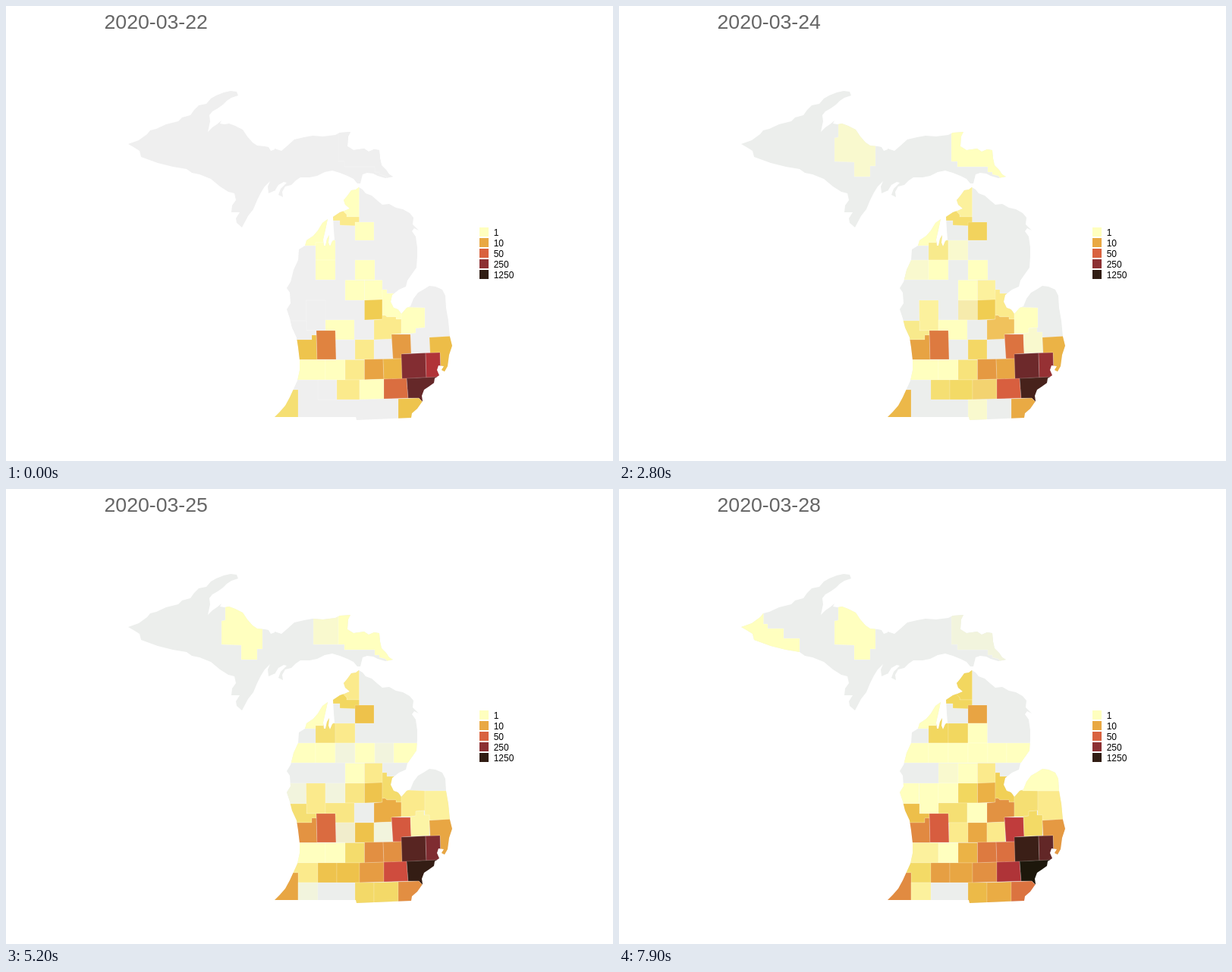
Write an HTML page that moves like this. It is 800 px wide and 600 px high and loops after 8000 ms.

```html
<!DOCTYPE html>
<html lang="en">
<head>
<meta charset="utf-8">
<title>Daily cases by county</title>
<style>
html, body { margin: 0; width: 100%; height: 100%; overflow: hidden; background: #fff; }
svg { display: block; width: 800px; height: 600px; font-family: "Liberation Sans", Arial, sans-serif; }
#date { font-size: 26.67px; fill: #666; }
#legend { font-size: 12px; }
#counties { stroke: #fff; stroke-opacity: .3; stroke-width: .6; }
</style>
</head>
<body>
<svg viewBox="0 0 800 600">
<clipPath id="land">
  <!-- upper peninsula, west and east -->
  <path d="M161 182L175 177 186 169 190 164 198 162 211 156 227 152 232 147 243 144 248 137 254 131 264 129 270 122 277 118 287 114 296 112 304 113 306 118 297 121 291 125 286 130 279 135 272 139 268 144 269 152 266 166 272 160 278 156 284 151 282 155 288 156 294 155 302 158 312 163 318 172 325 180 331 184 341 185 346 186 349 191 355 189V243L346 247 345 238 348 231 341 238 336 246 331 256 326 268 319 277 311 292 304 286 303 280 308 272 297 272 298 263 303 256 301 247 293 245 282 238 270 228 255 222 245 220 238 215 220 212 200 207 178 199 176 191 168 186z"/>
  <path d="M354 188L363 191 370 185 380 176 393 173 404 171 418 172 434 170 440 167 454 166 451 172 450 185 458 190 472 188 478 192 485 189 492 190 493 201 495 210 501 216 505 222 510 225 500 227 490 224 484 221 476 220 470 222 467 234 463 234 458 228 450 224 440 220 430 217 420 219 410 224 400 226 388 226 382 230 376 236 368 238 364 245 365 252 359 249 362 241 370 233 366 232 359 236 354 244z"/>
  <!-- lower peninsula, north and south -->
  <path d="M465 239L470 242 474 247 482 250 490 257 496 262 505 261 514 266 523 268 532 273 537 279 536 288 544 296 538 293 535 297 540 304 542 318 542 330 541 345 536 352 529 362 528 364H375L379 348 385 335 386 321 394 316 396 309 405 303 411 296 417 286 424 281 421 295 418 308 419 316 421 316 423 307 426 302 425 312 427 317 430 310 433 308 432 296 431 278 440 272 446 270 453 267 447 262 445 256 450 250 455 243 461 242z"/>
  <path d="M376 362H529L527 370 518 374 509 381 507 390 511 398 517 400 521 406 528 398 533 396 537 386 543 378 550 374 558 369 566 370 575 374 579 382 580 398 583 415 585 436 588 448 584 460 582 475 578 482 574 480 577 475 570 474 568 480 571 487 565 491 564 497 557 502 551 506 548 514 549 521 542 531 535 537 534 543 462 546 461 542 354 542 361 535 368 527 374 516 379 505 384 494 387 480 387 467 385 450 383 437 377 424 374 412 370 400 375 392 374 378 370 372z"/>
</clipPath>
<g clip-path="url(#land)">
  <rect id="base" width="800" height="600"/>
  <!-- data-cases: one count per day, 0 for no report -->
  <g id="counties">
    <path data-cases="0 0 0 0 0 1 1" d="M155 160H190.500V178H196V184H217V197H238V220H155z"/>
    <path data-cases="0 0 1 1 1 1 1" d="M289 150H318L333 184 338 183V211H331V225H310V206L284 205V174L289 173z"/>
    <path data-cases="0 0 0 1 0 0 0" d="M405 168H438V205H405z"/>
    <path data-cases="0 1 1 1 1 1 0" d="M438 164H515V230H505L500 224 492 222V219H486V212H446V205H438z"/>
    <path data-cases="1 1 2 2 2 4 4" d="M440 236H465.500V278H449V275L440 269z"/>
    <path data-cases="2 2 4 4 4 4 4" d="M429 266H440L449 275V278H465.500V290L440 289V283H429z"/>
    <path data-cases="1 3 5 6 7 11 11" d="M460 285H485V309H460z"/>
    <path data-cases="1 1 1 1 1 1 1" d="M390 278H426L421 300 418 312H408V316H390z"/>
    <path data-cases="1 1 3 3 3 4 4" d="M408 312H418L422 300H432V309H434V335H408z"/>
    <path data-cases="0 0 1 2 2 4 4" d="M434 309H460V335H434z"/>
    <path data-cases="0 0 0 0 0 1 1" d="M460 309H485.500V335H460z"/>
    <path data-cases="0 0 1 1 1 1 1" d="M374 335H408V361H374z"/>
    <path data-cases="1 1 1 1 1 1 1" d="M408 335H434V361H408z"/>
    <path data-cases="0 0 0 0 1 1 1" d="M434 335H460V361H434z"/>
    <path data-cases="1 1 1 1 1 1 1" d="M460 335H486V361H460z"/>
    <path data-cases="0 0 0 0 1 1 1" d="M486 335H511V361H486z"/>
    <path data-cases="0 0 0 1 1 1 1" d="M511 335H545V361H511z"/>
    <path data-cases="0 0 0 0 0 0 1" d="M421 361.500H447V388H421z"/>
    <path data-cases="1 1 1 1 1 1 1" d="M447 361.500H472.500V388H447z"/>
    <path data-cases="1 1 2 2 2 2 2" d="M472.500 361.500H496V374L497 388H472.500z"/>
    <path data-cases="0 0 0 0 1 1 1" d="M366 388H395.500V415H366z"/>
    <path data-cases="0 1 2 2 2 1 1" d="M395.500 388H421V428H396z"/>
    <path data-cases="0 0 0 0 1 1 1" d="M421 388H447V414H421z"/>
    <path data-cases="0 0 2 2 3 4 4" d="M447 388H472.500V414H447z"/>
    <path data-cases="5 5 5 6 6 8 9" d="M472.500 388L496 387V413L472.500 414z"/>
    <path data-cases="1 2 2 3 4 4 5" d="M496 374H502V379H512V396L521 404V413H514V410H502L500 408H496z"/>
    <path data-cases="0 1 3 3 3 6 7" d="M370 415H396V428H409V434H403V440H380z"/>
    <path data-cases="1 1 1 2 3 3 3" d="M421 414H459V440H434V428H421z"/>
    <path data-cases="0 0 0 0 0 1 1" d="M459 414H485V440H459z"/>
    <path data-cases="2 2 9 9 10 17 18" d="M485 414L496 413V408H500L502 410H514V413H521V432L508 433V439L485 440z"/>
    <path data-cases="1 1 1 2 2 3 3" d="M521 400L528 397 552 398V424L540 425V431L533 432H521z"/>
    <path data-cases="0 0 0 2 1 2 2" d="M552 398H584L590 436 558 437V430H552z"/>
    <path data-cases="0 0 0 0 0 1 1" d="M532 366H585V398H532z"/>
    <path data-cases="6 9 13 16 19 21 24" d="M380 440H403V434H409L410 466.500H380z"/>
    <path data-cases="28 32 34 43 45 51 58" d="M409 428H434L435 466H410z"/>
    <path data-cases="0 0 0 0 2 2 2" d="M435 440H460V466H435z"/>
    <path data-cases="2 2 5 6 7 9 11" d="M460 440H485V466H460z"/>
    <path data-cases="0 0 0 0 1 2 2" d="M485 440L509 439V465L485 466z"/>
    <path data-cases="14 23 46 53 80 110 135" d="M508 433H533L534 458 522 459V465H510z"/>
    <path data-cases="0 0 1 1 3 3 4" d="M533 432L540 431V425L551 424V430H558V457L534 458z"/>
    <path data-cases="7 7 9 10 12 14 15" d="M558 437L592 435V488H573L572 457 559 458z"/>
    <path data-cases="1 1 1 1 1 1 2" d="M380 466.500H421V493H380z"/>
    <path data-cases="1 1 1 1 1 1 1" d="M421 466.500H447V493H421z"/>
    <path data-cases="2 2 3 3 4 7 9" d="M447 466.500H472.500V493H447z"/>
    <path data-cases="11 11 17 18 22 30 35" d="M472.500 466L497 465.500 498 492 472.500 493z"/>
    <path data-cases="8 8 13 17 23 37 42" d="M497 465.500L522 465V492H498z"/>
    <path data-cases="329 375 465 545 670 900 1060" d="M521 459L553 457.500 554 490 522 492z"/>
    <path data-cases="172 200 240 320 385 470 515" d="M553 457.500L572 457 573 490H554z"/>
    <path data-cases="0 0 0 2 2 3 4" d="M375 493H411V519H385V506H375z"/>
    <path data-cases="0 3 3 5 9 12 13" d="M411 493H436V519H411z"/>
    <path data-cases="2 3 4 6 7 10 11" d="M436 493H466V519H436z"/>
    <path data-cases="1 1 7 12 17 18 19" d="M466 493L498 492V518L466 519z"/>
    <path data-cases="42 50 55 75 100 150 185" d="M498 492L528 491 530 517 498 518z"/>
    <path data-cases="477 640 880 1080 1390 1750 2200" d="M528 491L570 489V522H549L544 517H530z"/>
    <path data-cases="3 5 9 10 12 19 23" d="M350 506H385V546H350z"/>
    <path data-cases="0 0 0 0 1 1 2" d="M385 519H411V545H385z"/>
    <path data-cases="0 0 1 3 5 6 8" d="M460 519H485V548H460z"/>
    <path data-cases="0 0 0 3 5 8 10" d="M485 519L517 518V548H485z"/>
    <path data-cases="6 7 12 18 25 33 41" d="M517 518L544 517 549 522V548H517z"/>
  </g>
</g>
<text id="date" x="129.500" y="30"></text>
<g id="legend"></g>
</svg>
<script>
const LOOP = 8000, STEP = 100, STEPS = 6;
const STARTS = [1200, 2500, 3800, 5100, 6400, 7600];
const STILL_GREY = [239, 239, 239], MOVING_GREY = [236, 238, 236];

// Colour stops along a logarithmic count scale
const SCALE = [
  [1, 'ffffbf'], [2, 'fbea8c'], [3, 'f5df73'], [4, 'f2d75f'], [5, 'f0cd52'], [7, 'edbd48'],
  [10, 'e9a843'], [20, 'e18d42'], [28, 'e08340'], [42, 'da6e40'], [50, 'd9623f'], [100, 'cb433e'],
  [175, 'b03338'], [250, '8c3033'], [329, '832d32'], [477, '652829'], [640, '51241f'],
  [1250, '311d13'], [2000, '1b160a']
].map(([count, hex]) => [Math.log(count), hex.match(/../g).map(h => parseInt(h, 16))]);

const mix = (a, b, t) => a.map((v, i) => v + (b[i] - v) * t);
const rgb = c => `rgb(${c.map(Math.round)})`;

function countColor(count) {
  const x = Math.log(count);
  const i = SCALE.findIndex(([stop]) => stop >= x);
  if (i < 0) return SCALE[SCALE.length - 1][1];
  if (i === 0) return SCALE[0][1];
  const [x0, c0] = SCALE[i - 1], [x1, c1] = SCALE[i];
  return mix(c0, c1, (x - x0) / (x1 - x0));
}

const base = document.getElementById('base');
const dateLabel = document.getElementById('date');
const counties = [...document.querySelectorAll('#counties path')].map(path => ({
  path,
  colors: path.dataset.cases.split(' ').map(n => +n ? countColor(+n) : null)
}));

document.getElementById('legend').innerHTML = [1, 10, 50, 250, 1250].map((count, i) =>
  `<rect x="624" y="${292 + 14 * i}" width="12" height="12" fill="${rgb(countColor(count))}"/>
   <text x="642.700" y="${303 + 14 * i}">${count}</text>`).join('');

function draw(time) {
  const next = STARTS.filter(start => start <= time).length;
  const day = Math.max(0, next - 1);
  const step = next ? Math.min(STEPS, Math.floor((time - STARTS[day]) / STEP) + 1) : 0;
  const blend = step / STEPS;
  const grey = step % STEPS ? MOVING_GREY : STILL_GREY;

  base.setAttribute('fill', rgb(grey));
  for (const { path, colors } of counties) {
    const from = colors[day], to = colors[day + 1];
    path.style.display = from || to ? '' : 'none';
    path.setAttribute('fill', rgb(mix(from || grey, to || grey, blend)));
  }
  dateLabel.textContent = `2020-03-${22 + day + (blend > .5 ? 1 : 0)}`;
}

const began = performance.now();
function tick() {
  draw((performance.now() - began) % LOOP);
  requestAnimationFrame(tick);
}
tick();
</script>
</body>
</html>
```
